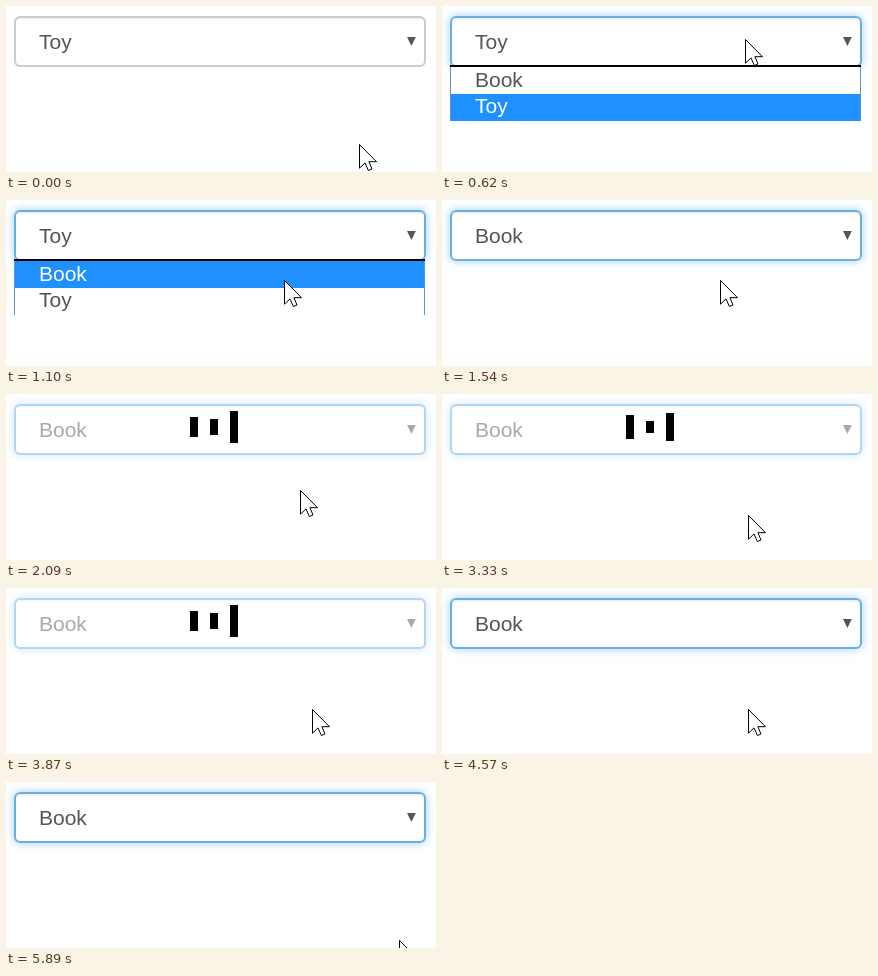
An HTML page that plays this animation: 430 by 166 pixels, repeating every 6.75 s.

```html
<!DOCTYPE html>
<html lang="en">
<head>
<meta charset="utf-8">
<title>Select with loading state</title>
<style>
  html, body { margin: 0; width: 100%; height: 100%; overflow: hidden; background: #fff; }
  #field {
    --inner: inset 0 1.5px 1.5px rgba(0, 0, 0, .075);
    position: absolute; left: 8px; top: 10px; width: 412px; height: 51px;
    box-sizing: border-box; border: 2px solid #ccc; border-radius: 6px;
    box-shadow: var(--inner);
  }
  #field.focus { border-color: #66afe9; box-shadow: var(--inner), 0 0 10px rgba(102, 175, 233, .6); }
  svg { position: absolute; left: 0; top: 0; }
  text { font: 21px "Liberation Sans", Arial, sans-serif; fill: #555; }
  text.on { fill: #fff; }
  #loader { shape-rendering: crispEdges; }
</style>
</head>
<body>
<div id="field"></div>
<svg width="430" height="166" viewBox="0 0 430 166">
  <g id="value">
    <text id="label" x="33" y="43">Toy</text>
    <path d="M401 31h8.8l-4.4 9z" fill="#555"/>
  </g>
  <g id="list">
    <path d="M8 60H419V115H8z" fill="#fff"/>
    <path d="M8.5 60V115M418.5 60V115" stroke="#5c92dc"/>
    <rect id="highlight" x="9" width="409" height="27" fill="#1e90ff"/>
    <path d="M8 59H419V61H8z"/>
    <text id="book" x="33" y="81">Book</text>
    <text id="toy" x="33" y="107">Toy</text>
  </g>
  <g id="loader">
    <rect x="184" width="8"/>
    <rect x="204" width="8"/>
    <rect x="224" width="8"/>
  </g>
  <path id="cursor" d="M.5 .5V24.2L6 18.9 9.4 26.5 13 25 9.9 17.7H17.5z"
        fill="#fff" stroke="#000" stroke-linejoin="round"/>
</svg>
<script>
const LOOP = 6750, FRAME = 77.8;
const FOCUS = 530, OPEN = 620, CHOOSE = 1540, BUSY = 1610, DONE = 4565;

// the pointer rests between these moves, each made in a few straight steps
const moves = [
  { start: 70, steps: 2, x: 303, y: 33 },
  { start: 850, steps: 4, x: 278, y: 80 },
  { start: 2010, steps: 2, x: 294, y: 96 },
  { start: 2165, steps: 2, x: 306, y: 121 },
  { start: 5110, steps: 4, x: 335, y: 60 },
  { start: 5660, steps: 4, x: 412, y: 190 }
];

const $ = id => document.getElementById(id);
const show = (id, on) => $(id).style.display = on ? '' : 'none';
const stepsSince = (start, t) => Math.floor((t - start) / FRAME);

function pointerAt(t) {
  let x = 353, y = 138;
  for (const move of moves) {
    if (t < move.start) break;
    const p = Math.min(1, (stepsSince(move.start, t) + 1) / move.steps);
    x += (move.x - x) * p;
    y += (move.y - y) * p;
  }
  return { x, y };
}

// bars pulse three times in 23 steps, each a quarter period after the last
function drawLoader(t) {
  const turns = stepsSince(CHOOSE - 7, t) * 3 / 23 + .23;
  document.querySelectorAll('#loader rect').forEach((bar, i) => {
    const phase = (turns + 1 - i / 4) % 1;
    const height = 10 + 32 * (1 - Math.abs(2 * phase - 1));
    bar.setAttribute('height', height);
    bar.setAttribute('y', 33 - height / 2);
  });
}

function draw(t) {
  const { x, y } = pointerAt(t);
  const busy = t >= BUSY && t < DONE;
  const onBook = y > 61;

  $('field').classList.toggle('focus', t >= FOCUS);
  $('field').style.opacity = $('value').style.opacity = busy ? .5 : 1;
  $('label').textContent = t < CHOOSE ? 'Toy' : 'Book';

  show('list', t >= OPEN && t < CHOOSE);
  $('highlight').setAttribute('y', onBook ? 61 : 88);
  $('book').classList.toggle('on', onBook);
  $('toy').classList.toggle('on', !onBook);

  show('loader', busy);
  if (busy) drawLoader(t);

  $('cursor').setAttribute('transform', `translate(${Math.round(x)} ${Math.round(y)})`);
}

function tick() {
  draw(performance.now() % LOOP);
  requestAnimationFrame(tick);
}
tick();
</script>
</body>
</html>
```
